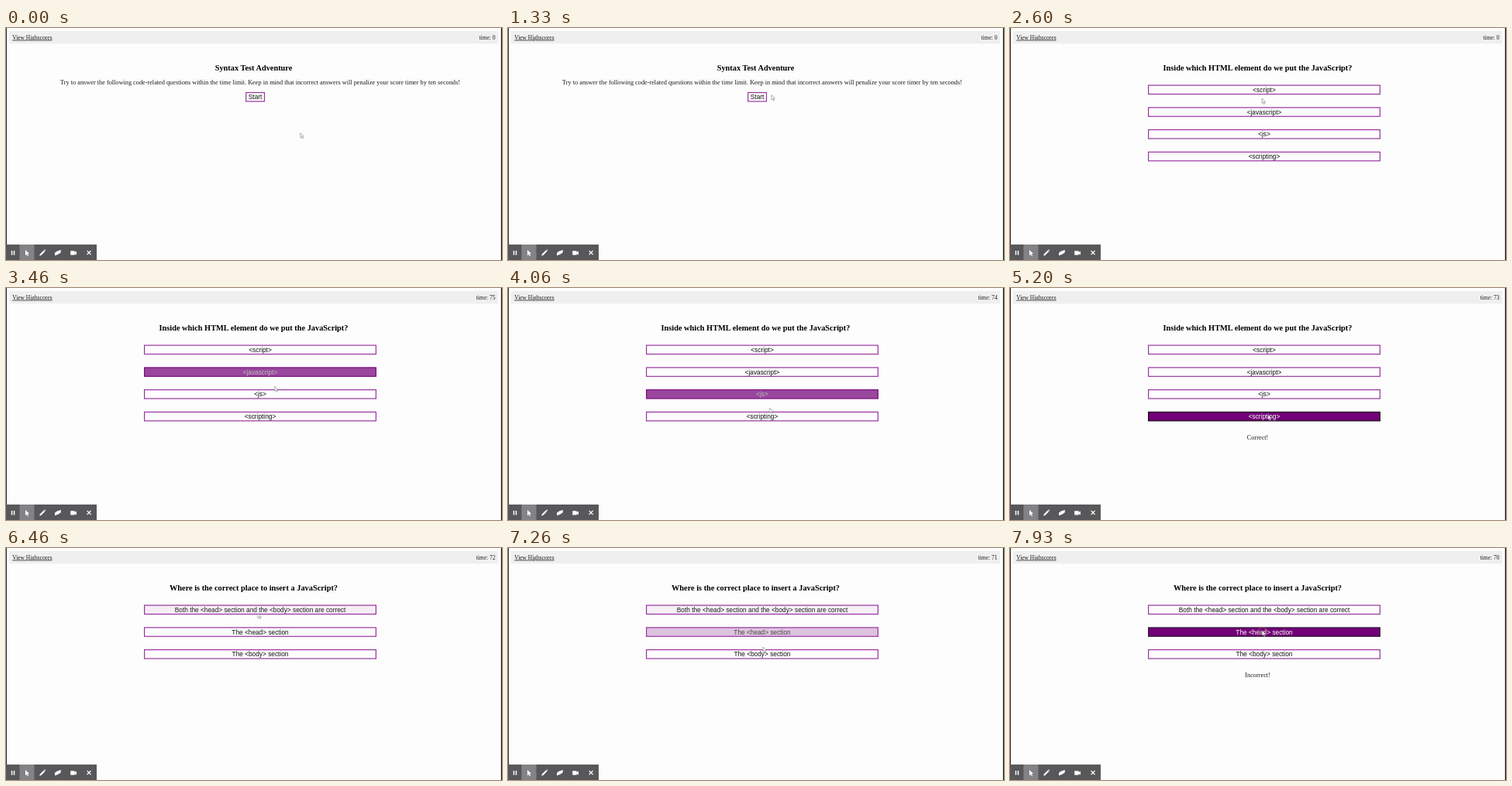
An HTML page for the animation above (8000 ms loop, 640 px wide and 300 px high).

```html
<!DOCTYPE html>
<html lang="en">
<head>
<meta charset="utf-8">
<title>Syntax Test Adventure</title>
<style>
  html, body { margin: 0; width: 100%; height: 100%; overflow: hidden; background: #fdfdfd; }
  svg { display: block; }
  :root { --paper: #fdfdfd; --ink: #111; --edge: #9a35a0; --hot: #720076; --mid: #b87fba; }

  text { font: 8.28px "Liberation Serif", "Times New Roman", serif; fill: #1c1c1c; text-anchor: middle; }
  .head { font-size: 10.33px; font-weight: bold; fill: #000; }
  .nav text { font-size: 7.5px; text-anchor: start; }
  .nav .count text { text-anchor: end; }
  .link { text-decoration: underline; }

  .btn { fill: var(--paper); color: var(--ink); stroke: var(--edge); stroke-width: 1.2; }
  .btn rect { x: -149.4px; y: -5.7px; width: 298.8px; height: 11.4px; }
  .btn.start rect { x: -11.9px; width: 23.8px; }
  .btn text { font: 8.3px "Liberation Sans", Arial, sans-serif; fill: currentColor; stroke: none; }

  .scene, .note, .ring, .count { animation: 8s step-end infinite; }
  .btn, .cursor { animation: 8s linear infinite; }

  .intro { animation-name: intro; }
  .q1 { animation-name: q1; }
  .q2 { animation-name: q2; }
  .right { animation-name: right; }
  .wrong { animation-name: wrong; }
  .ring { animation-name: ring; }
  .count { animation-name: count; }
  .cursor { animation-name: move; }
  .start { animation-name: start; }
  .a2 { animation-name: a2; }
  .a3 { animation-name: a3; }
  .a4 { animation-name: a4; }
  .b1 { animation-name: b1; }
  .b2 { animation-name: b2; }
  .b3 { animation-name: b3; }

  @keyframes intro { 0% { visibility: visible } 20.9%, 100% { visibility: hidden } }
  @keyframes q1 { 0% { visibility: hidden } 20.9% { visibility: visible } 71.9%, 100% { visibility: hidden } }
  @keyframes q2 { 0% { visibility: hidden } 71.9%, 100% { visibility: visible } }
  @keyframes right { 0% { visibility: hidden } 60% { visibility: visible } 71.9%, 100% { visibility: hidden } }
  @keyframes wrong { 0% { visibility: hidden } 97.4%, 100% { visibility: visible } }
  @keyframes ring {
    0% { opacity: 0 } 19.8% { opacity: .8 } 22.4% { opacity: 0 }
    59.4% { opacity: .8 } 62.5% { opacity: 0 } 97.4%, 100% { opacity: .8 }
  }
  @keyframes count {
    0% { transform: translateY(0) }
    33.4% { transform: translateY(-20px) }
    45.9% { transform: translateY(-40px) }
    58.4% { transform: translateY(-60px) }
    70.9% { transform: translateY(-80px) }
    83.4% { transform: translateY(-100px) }
    95.9%, 100% { transform: translateY(-120px) }
  }

  /* hover fades */
  @keyframes start {
    0%, 16.8% { fill: var(--paper); color: var(--ink) }
    20.6%, 100% { fill: var(--hot); color: #fff }
  }
  @keyframes a2 {
    0%, 34.75%, 46.5%, 100% { fill: var(--paper); color: var(--ink); stroke: var(--edge) }
    38.5%, 42% { fill: var(--hot); color: #fff; stroke: var(--hot) }
  }
  @keyframes a3 {
    0%, 44%, 54%, 100% { fill: var(--paper); color: var(--ink); stroke: var(--edge) }
    47.75%, 49.5% { fill: var(--hot); color: #fff; stroke: var(--hot) }
  }
  @keyframes a4 {
    0%, 52% { fill: var(--paper); color: var(--ink); stroke: var(--edge) }
    56.5%, 59.9% { fill: var(--hot); color: #fff; stroke: var(--hot) }
    60%, 100% { fill: var(--hot); color: #fff; stroke: #1a0a1a }
  }
  @keyframes b1 {
    0%, 80.5%, 91%, 100% { fill: var(--paper); color: var(--ink); stroke: var(--edge) }
    85%, 86.6% { fill: var(--hot); color: #fff; stroke: var(--hot) }
  }
  @keyframes b2 {
    0%, 76%, 80.6%, 87.5%, 92% { fill: var(--paper); color: var(--ink); stroke: var(--edge) }
    78%, 89.3% { fill: var(--mid); color: #888; stroke: var(--edge) }
    92.75% { fill: var(--paper); color: var(--ink); stroke: var(--edge) }
    96.5%, 97.3% { fill: var(--hot); color: #fff; stroke: var(--hot) }
    97.4%, 100% { fill: var(--hot); color: #fff; stroke: #33263a }
  }
  @keyframes b3 {
    0%, 73.25%, 78.5%, 100% { fill: var(--paper); color: var(--ink) }
    75.2% { fill: var(--mid); color: #888 }
  }

  @keyframes move {
    0%, .74% { transform: translate(379.7px, 135.6px) }
    .75%, 5.7% { transform: translate(311px, 95px) }
    8% { transform: translate(257px, 112px) }
    10.5% { transform: translate(330px, 135px) }
    13% { transform: translate(461px, 122px) }
    15% { transform: translate(400px, 72px) }
    16.8% { transform: translate(334px, 88px) }
    18%, 32.5% { transform: translate(325px, 91px) }
    34.75% { transform: translate(327px, 102px) }
    38% { transform: translate(333px, 108px) }
    42% { transform: translate(343px, 115px) }
    43.25% { transform: translate(346.6px, 127px) }
    44% { transform: translate(347px, 131px) }
    47% { transform: translate(344px, 139px) }
    49.5% { transform: translate(339px, 144px) }
    50.75% { transform: translate(337.6px, 155px) }
    52% { transform: translate(336px, 160px) }
    55%, 72% { transform: translate(333px, 164px) }
    73.25% { transform: translate(332px, 144px) }
    75% { transform: translate(331px, 132px) }
    76% { transform: translate(329px, 115px) }
    77.9% { transform: translate(327px, 102px) }
    80.75% { transform: translate(324.8px, 84.2px) }
    83%, 86% { transform: translate(326px, 80px) }
    86.6% { transform: translate(327px, 86px) }
    87.5% { transform: translate(328px, 102px) }
    89.3% { transform: translate(330px, 116px) }
    91% { transform: translate(329px, 130px) }
    92.75% { transform: translate(327px, 115px) }
    94%, 100% { transform: translate(325.6px, 107px) }
  }
</style>
</head>
<body>
<svg width="640" height="300" viewBox="0 0 640 300">
  <rect width="640" height="300" fill="#fdfdfd"/>
  <rect x="4" y="4" width="631" height="16.3" fill="#efefef"/>
  <path d="M0 0h.9v300H0zM638.8 0h1.2v300h-1.2z" fill="#111"/>

  <g class="nav">
    <text class="link" x="8.2" y="14.6">View Highscores</text>
    <svg x="560" y="4" width="74" height="16" overflow="hidden">
      <g class="count">
        <text x="71.5" y="10.6">time: 0</text>
        <text x="71.5" y="30.6">time: 75</text>
        <text x="71.5" y="50.6">time: 74</text>
        <text x="71.5" y="70.6">time: 73</text>
        <text x="71.5" y="90.6">time: 72</text>
        <text x="71.5" y="110.6">time: 71</text>
        <text x="71.5" y="130.6">time: 70</text>
      </g>
    </svg>
  </g>

  <g class="scene intro">
    <text class="head" x="319.5" y="54.6">Syntax Test Adventure</text>
    <text x="328" y="72.8">Try to answer the following code-related questions within the time limit. Keep in mind that incorrect answers will penalize your score timer by ten seconds!</text>
    <g class="btn start" transform="translate(321.6 89.2)"><rect/><text y="2.9">Start</text></g>
  </g>

  <g class="scene q1">
    <text class="head" x="319.5" y="54.6">Inside which HTML element do we put the JavaScript?</text>
    <g class="btn" transform="translate(328 79.8)"><rect/><text y="2.9">&lt;script&gt;</text></g>
    <g class="btn a2" transform="translate(328 108.6)"><rect/><text y="2.9">&lt;javascript&gt;</text></g>
    <g class="btn a3" transform="translate(328 137.3)"><rect/><text y="2.9">&lt;js&gt;</text></g>
    <g class="btn a4" transform="translate(328 166.1)"><rect/><text y="2.9">&lt;scripting&gt;</text></g>
  </g>
  <text class="note right" x="319.6" y="196">Correct!</text>

  <g class="scene q2">
    <text class="head" x="319.5" y="54.6">Where is the correct place to insert a JavaScript?</text>
    <g class="btn b1" transform="translate(328 79.8)"><rect/><text y="2.9">Both the &lt;head&gt; section and the &lt;body&gt; section are correct</text></g>
    <g class="btn b2" transform="translate(328 108.6)"><rect/><text y="2.9">The &lt;head&gt; section</text></g>
    <g class="btn b3" transform="translate(328 137.3)"><rect/><text y="2.9">The &lt;body&gt; section</text></g>
  </g>
  <text class="note wrong" x="319.6" y="167.3">Incorrect!</text>

  <!-- recorder toolbar -->
  <g transform="translate(0 280)">
    <rect width="117" height="20" fill="#58585a"/>
    <rect x="17.5" width="19" height="20" fill="#838385"/>
    <g fill="#fff">
      <path d="M6.8 8h1.5v5.6H6.8zM9.8 8h1.5v5.6H9.8z"/>
      <path d="M25 7v7.2l1.7-1.6 1.3 2.6 1.1-.6-1.3-2.5h2.3z"/>
      <path d="M43.2 14.4l.5-2 5-5 1.6 1.6-5 5zM49.2 6.9l.7-.6 1.5 1.5-.7.7z"/>
      <path d="M63 14.2v-3.4l3-2.2 5-1.6-.4 3.4-3.4 2.3z"/>
      <path d="M83.2 8.2h5.4v1.7l2.4-1.5v5l-2.4-1.5v1.7h-5.4z"/>
    </g>
    <path d="M104.6 8l5 5M109.6 8l-5 5" stroke="#fff" stroke-width="1.1"/>
  </g>

  <g class="cursor">
    <circle class="ring" r="4.8" fill="none" stroke="#c8707c" stroke-width=".9"/>
    <path d="M0 0v6.3l1.5-1.3 1.1 2.4 1-.5-1.1-2.3h2z" fill="#fff" stroke="#777" stroke-width=".6"/>
  </g>
</svg>
</body>
</html>
```
